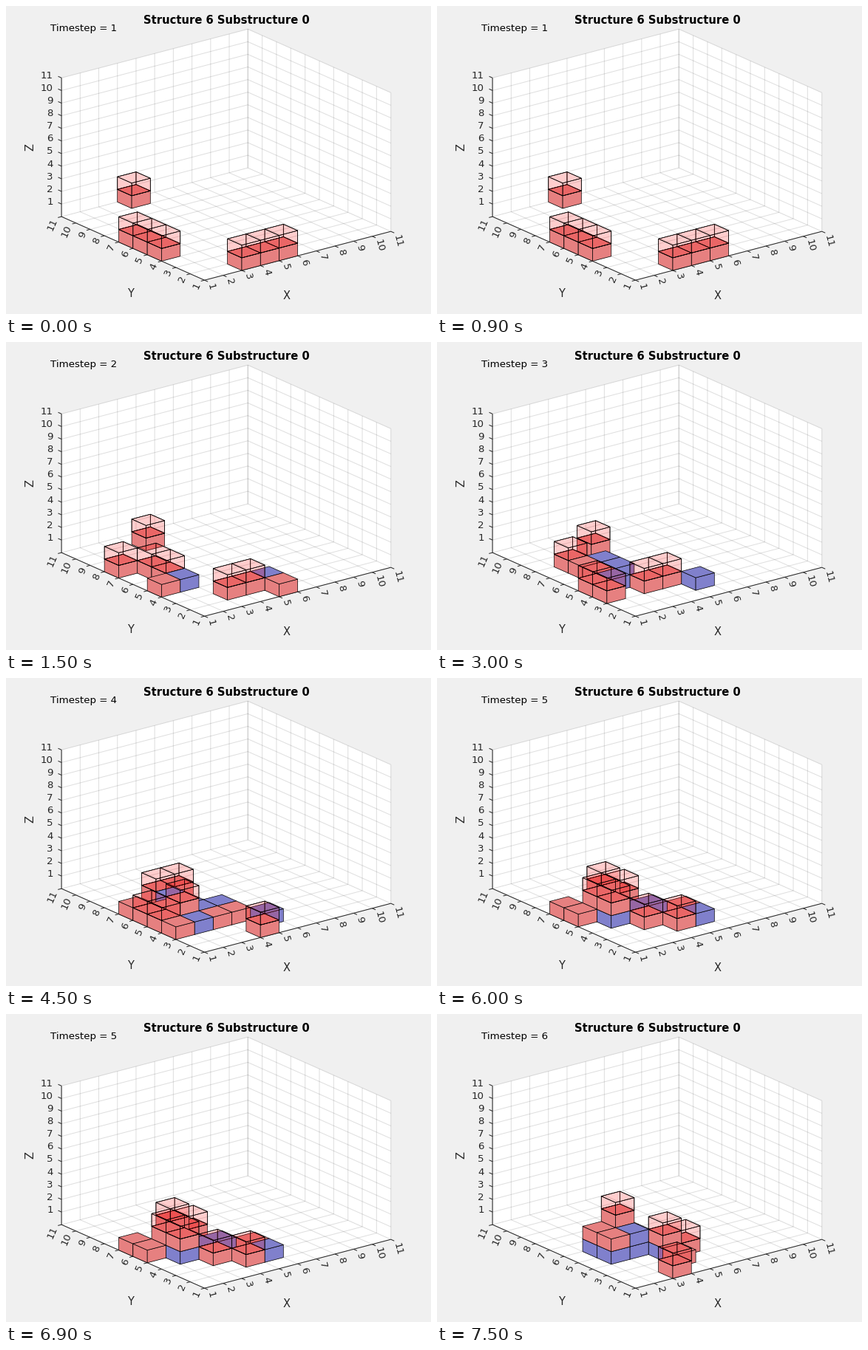
A matplotlib script that plays this animation: 575x417 px, repeating every 8 s.

```python
import math
from collections import Counter

import matplotlib.pyplot as plt
from matplotlib.animation import FuncAnimation
from matplotlib.collections import LineCollection, PolyCollection

W, H = 575, 417
INK = "#262626"
RED = (0.9, 0.5, 0.5, 1)
BLUE = (0.5, 0.5, 0.8, 1)
GHOST = (1, 0, 0, 0.1)

# Orthographic view stretched to fill the plot box
AZ, EL = math.radians(37.5), math.radians(30)
LEFT, BOTTOM = 75.1, 371.2
KX = 445.6 / (math.cos(AZ) + math.sin(AZ))
KY = 339.9 / ((math.cos(AZ) + math.sin(AZ)) * math.sin(EL) + math.cos(EL))
XV = (KX * math.cos(AZ) / 10, -KY * math.sin(AZ) * math.sin(EL) / 10)
YV = (-KX * math.sin(AZ) / 10, -KY * math.cos(AZ) * math.sin(EL) / 10)
ZV = -KY * math.cos(EL) / 11
ORIGIN = (LEFT - 10 * YV[0], BOTTOM)

# Robots: first step, x, y, route. Capitals move one cell, small letters
# set down (or, when empty, pick up) a block on that side, a dot waits.
# A robot leaves when its route ends.
ROBOTS = [
    (0, 4, 10, "SSSSs"), (0, 1, 6, "EeW."), (0, 1, 5, "Ee."), (0, 1, 4, "e"),
    (0, 3, 1, "NNnwE"), (0, 4, 1, "NNnEs"), (0, 5, 1, "n"),
    (1, 1, 7, "EESS"), (2, 1, 4, "ENe"), (2, 1, 3, "e"),
    (3, 1, 5, "e"), (3, 1, 4, "Ee"), (3, 4, 1, "Nn"), (5, 3, 1, ""),
]
SIDES = {"N": (0, 1), "S": (0, -1), "E": (1, 0), "W": (-1, 0), ".": (0, 0)}


def simulate(step):
    """Block heights per column and the robots present at a step."""
    heights, robots = Counter(), {}
    for t in range(step + 1):
        for i, (start, x, y, route) in enumerate(ROBOTS):
            age = t - start
            if age == 0:
                robots[i] = (x, y, True)
            elif age > len(route):
                robots.pop(i, None)
            elif age > 0:
                x, y, loaded = robots[i]
                act = route[age - 1]
                dx, dy = SIDES[act.upper()]
                if act.islower():
                    heights[x + dx, y + dy] += 1 if loaded else -1
                    robots[i] = (x, y, not loaded)
                else:
                    robots[i] = (x + dx, y + dy, loaded)
    return heights, robots.values()


def project(x, y, z):
    return (ORIGIN[0] + (x - 1) * XV[0] + (y - 1) * YV[0],
            ORIGIN[1] + (x - 1) * XV[1] + (y - 1) * YV[1] + z * ZV)


def face(pos, axis, far):
    """One side of the unit cube at pos, with the neighbour beyond it."""
    u, v = [a for a in range(3) if a != axis]
    corners = []
    for du, dv in ((0, 0), (1, 0), (1, 1), (0, 1)):
        p = list(pos)
        p[axis] += far
        p[u] += du
        p[v] += dv
        corners.append(project(*p))
    beyond = list(pos)
    beyond[axis] += 1 if far else -1
    return corners, tuple(beyond)


HIDDEN = [(2, 0), (0, 1), (1, 1)]
VISIBLE = [(0, 0), (1, 0), (2, 1)]


def scene(step):
    heights, robots = simulate(step)
    cubes = {(x, y, z): BLUE for (x, y), n in heights.items()
             for z in range(n)}
    for x, y, loaded in robots:
        z = heights[x, y]
        cubes[x, y, z] = RED
        if loaded:
            cubes[x, y, z + 1] = GHOST

    polys, colors = [], []
    for pos in sorted(cubes, key=lambda p: (-p[0], -p[1], p[2])):
        color = cubes[pos]
        sides = HIDDEN + VISIBLE if color == GHOST else VISIBLE
        for side in sides:
            corners, beyond = face(pos, *side)
            if color == GHOST and cubes.get(beyond) == GHOST:
                continue
            polys.append(corners)
            colors.append(color)
    return polys, colors


def toward(p, v, dist):
    n = math.hypot(*v)
    return p[0] + v[0] / n * dist, p[1] + v[1] / n * dist


fig = plt.figure(figsize=(W / 100, H / 100), dpi=100, facecolor="#f0f0f0")
ax = fig.add_axes([0, 0, 1, 1])
ax.set_xlim(0, W)
ax.set_ylim(H, 0)
ax.axis("off")


def text(x, y, s, px=13.33, **kw):
    kw = {"color": INK, "ha": "center", "va": "center_baseline", **kw}
    return ax.text(x, y, s, fontsize=px * 0.72, family="DejaVu Sans", **kw)


def draw_box():
    walls = [
        [(1, 1, 0), (11, 1, 0), (11, 11, 0), (1, 11, 0)],
        [(1, 11, 0), (11, 11, 0), (11, 11, 11), (1, 11, 11)],
        [(11, 1, 0), (11, 11, 0), (11, 11, 11), (11, 1, 11)],
    ]
    ax.add_collection(PolyCollection(
        [[project(*p) for p in w] for w in walls], facecolors="white", lw=0))

    grid = []
    for i in range(1, 12):
        grid += [[(i, 1, 0), (i, 11, 0), (i, 11, 11)],
                 [(1, i, 0), (11, i, 0), (11, i, 11)],
                 [(1, 11, i), (11, 11, i), (11, 1, i)]]
    ax.add_collection(LineCollection(
        [[project(*p) for p in g] for g in grid],
        colors=[(0.15, 0.15, 0.15, 0.15)], linewidths=0.72))

    out_x, out_y = (-XV[0], -XV[1]), (-YV[0], -YV[1])
    x_turn = -90 + math.degrees(math.atan2(-XV[1], XV[0]))
    y_turn = 90 - math.degrees(math.atan2(-YV[1], -YV[0]))
    lines = [[project(11, 1, 0), project(1, 1, 0),
              project(1, 11, 0), project(1, 11, 11)]]
    for i in range(1, 12):
        px, py, pz = project(i, 1, 0), project(1, i, 0), project(1, 11, i)
        lines += [[px, toward(px, out_y, 5)], [py, toward(py, out_x, 5)],
                  [pz, toward(pz, YV, 5)]]
        text(*toward(px, out_y, 10), str(i), ha="left",
             rotation=x_turn, rotation_mode="anchor")
        text(*toward(py, out_x, 10.5), str(i), ha="right",
             rotation=y_turn, rotation_mode="anchor")
        zx, zy = toward(pz, YV, 12.5)
        text(zx, zy + 0.8, str(i), ha="right")
    ax.add_collection(LineCollection(lines, colors=INK, linewidths=0.72))


draw_box()
text(298, 24, "Structure 6 Substructure 0", 14.75, weight="bold",
     color="black", va="baseline")
text(380, 391.3, "X", 14.67)
text(168, 388, "Y", 14.67)
text(33, 190.5, "Z", 14.67, rotation=90, va="center")
clock = text(60, 34, "", color="black", ha="left", va="baseline")
cubes = PolyCollection([], edgecolors="black", linewidths=0.5,
                       joinstyle="round", zorder=5)
ax.add_collection(cubes)


def update(frame):
    step = frame // 3
    polys, colors = scene(step)
    cubes.set_verts(polys)
    cubes.set_facecolor(colors)
    clock.set_text(f"Timestep = {step + 1}")
    return cubes, clock


anim = FuncAnimation(fig, update, frames=16, interval=500, repeat=True,
                     repeat_delay=0, init_func=lambda: update(0))
plt.show()
```
